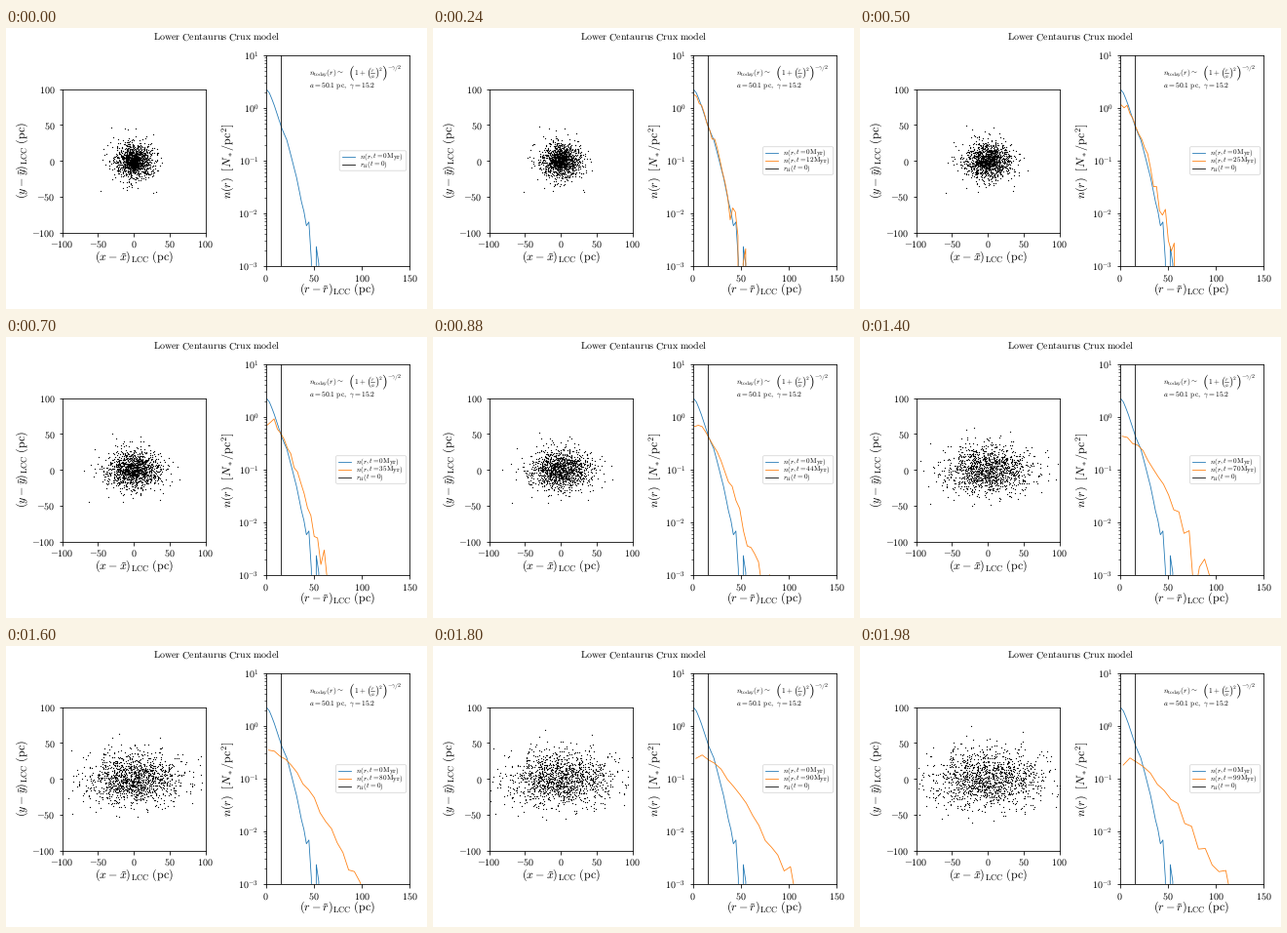
These frames come from a looping animation (432 by 288 pixels, 2000 ms). A matplotlib script:

```python
import numpy as np
import matplotlib.pyplot as plt
from matplotlib.animation import FuncAnimation
from matplotlib.patches import FancyBboxPatch

W, H, FRAMES = 432, 288, 100
BINS = 25
THIN = 0.8

plt.rcParams.update({"mathtext.fontset": "cm", "font.size": 10,
                     "text.hinting": "none"})

# initial log10 surface density at a few radii (pc), with two gaps in the tail
KEY_R = [0, 4, 9, 17, 22, 32, 42, 46, 48, 53, 58, 63]
KEY_LOG = [.38, .29, .05, -.4, -.6, -1.3, -2.2, -2.1, -4.5, -2.35, -4.5, -2.6]

# radii at even steps of the cumulative star count, with random angles
grid = np.linspace(0, 64, 3000)
ring = 2 * np.pi * grid * 10 ** np.interp(grid, KEY_R, KEY_LOG)
total = np.cumsum(ring) * grid[1]
stars = int(total[-1])
radius = np.interp(np.arange(stars) + 0.5, total, grid)
rng = np.random.default_rng(7)
angle = rng.uniform(0, 2 * np.pi, stars)
x0, y0 = radius * np.cos(angle), radius * np.sin(angle)
vx, vy = rng.normal(0, 0.37, stars), rng.normal(0, 0.17, stars)


def positions(t):
    return x0 + vx * t, y0 + vy * t


def profile(t):
    """Stars per area in rings that widen as the group spreads."""
    edges = np.arange(BINS + 1) * np.hypot(2.574, 0.0673 * t)
    count, _ = np.histogram(np.hypot(*positions(t)), edges)
    density = count / (np.pi * np.diff(edges ** 2))
    return (edges[1:] + edges[:-1]) / 2, np.maximum(density, 1e-30)


fig = plt.figure(figsize=(W / 72, H / 72), dpi=72, facecolor="white")


def panel(left, top, right, bottom):
    return fig.add_axes([left / W, 1 - bottom / H,
                         (right - left) / W, (bottom - top) / H])


def ticks(values):
    return values, [f"${v}$" for v in values]


sky = panel(57.5, 62.6, 204.5, 209.6)
sky.set(xlim=(-100, 100), ylim=(-100, 100))
sky.set_xticks(*ticks([-100, -50, 0, 50, 100]))
sky.set_yticks(*ticks([-100, -50, 0, 50, 100]))
dots, = sky.plot(x0, y0, "o", color="black", ms=1.25, mew=0)

dens = panel(266.5, 28, 414, 244)
dens.set_yscale("log", nonpositive="clip")
dens.set(xlim=(0, 150), ylim=(1e-3, 10))
dens.set_xticks(*ticks([0, 50, 100, 150]))
powers = range(-3, 2)
dens.set_yticks([10.0 ** p for p in powers], [f"$10^{{{p}}}$" for p in powers])
dens.plot(*profile(0), color="C0", lw=THIN)
later, = dens.plot([], [], color="C1", lw=THIN)
dens.axvline(15.9, color="black", lw=THIN)

# overlay measured in pixels from the top left corner
page = fig.add_axes([0, 0, 1, 1], xlim=(0, W), ylim=(H, 0))
page.axis("off")


def label(x, y, text, size, **kw):
    return page.text(x, y, f"${text}$", fontsize=size,
                     **{"ha": "center", "va": "center", **kw})


def note(x, y, text, size=7.5):
    return label(x, y, text, size, ha="left", va="baseline")


label(216.5, 13, r"\mathrm{Lower\ Centaurus\ Crux\ model}", 10, va="baseline")
label(131, 235, r"(x-\tilde{x})_\mathrm{LCC}\ \mathrm{(pc)}", 12)
label(16.7, 136, r"(y-\tilde{y})_\mathrm{LCC}\ \mathrm{(pc)}", 12, rotation=90)
label(339.7, 268.5, r"(r-\tilde{r})_\mathrm{LCC}\ \mathrm{(pc)}", 12)
label(228.7, 136, r"n(r)\ \ [N_*/\mathrm{pc}^2]", 12, rotation=90)

note(311, 48, r"n_\mathrm{today}(r)\sim")
note(351, 49.7, "(", 15)
note(357, 48, "1+")
note(369.5, 48.7, "(", 11)
note(374, 45, "r", 5.5)
note(374, 51, "a", 5.5)
page.plot([373.7, 377.5], [46.3, 46.3], color="black", lw=0.5)
note(378, 48.7, ")", 11)
note(382, 43.5, "2", 5.3)
note(385, 49.7, ")", 15)
note(391, 43, r"-\gamma/2", 5.8)
note(311, 61, r"a=50.1\ \mathrm{pc},\ \gamma=15.2")

# legend
ROW, RIGHT, MIDDLE = 8.2, 410.7, 136
box = page.add_patch(FancyBboxPatch(
    (0, 0), 1, 1, boxstyle="round,pad=0,rounding_size=1.3",
    fc="white", ec="0.8", lw=THIN, alpha=0.8))


def density_name(t):
    return rf"n(r,t={t}\mathrm{{Myr}})"


rows = [(page.plot([], [], color=color, lw=THIN)[0], note(0, 0, name, 7.1))
        for color, name in [("C0", density_name(0)), ("C1", density_name(0)),
                            ("black", r"r_\mathrm{hl}(t=0)")]]


def set_legend(t):
    shown = rows if t else rows[::2]
    width = 68.5 if t < 10 else 72.1
    height = ROW * len(shown) + 4
    left, top = RIGHT - width, MIDDLE - height / 2
    box.set_bounds(left, top, width, height)
    rows[1][1].set_text(f"${density_name(t)}$")
    for row in rows:
        for part in row:
            part.set_visible(row in shown)
    for i, (line, text) in enumerate(shown):
        y = top + 2 + ROW * (i + 0.5)
        line.set_data([left + 2.5, left + 15.5], [y, y])
        text.set_position((left + 20.5, y + 2))


def update(t):
    dots.set_data(*positions(t))
    later.set_data(*(profile(t) if t else ([], [])))
    set_legend(t)
    return dots, later


anim = FuncAnimation(fig, update, frames=FRAMES, interval=20,
                     repeat=True, repeat_delay=0, blit=False)
plt.show()
```
